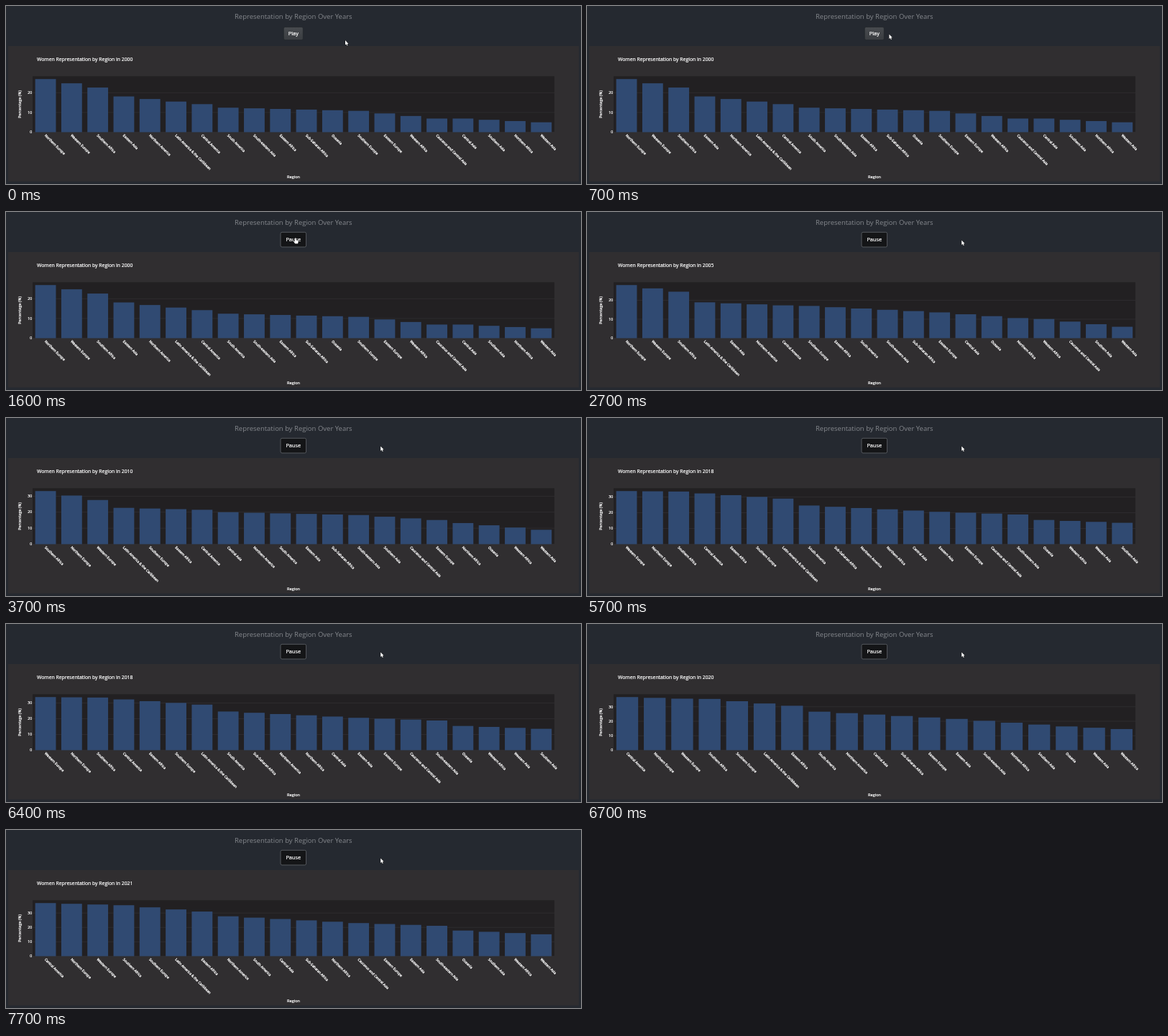
An HTML page with a canvas for the animation above (8 s loop, 800 by 249 pixels).

```html
<!DOCTYPE html>
<html lang="en">
<head>
<meta charset="utf-8">
<title>Representation by Region Over Years</title>
<style>
  html, body { margin: 0; height: 100%; overflow: hidden; background: #252930; }
  canvas { display: block; width: 800px; height: 249px; }
</style>
</head>
<body>
<canvas id="stage"></canvas>
<script>
const LOOP = 8000;
const PLOT = { x: 37, y: 98.3, w: 726, h: 78.2 };
const FONT = '"Open Sans", "Noto Sans", sans-serif';

const NAMES = {
  NEu: 'Northern Europe', WEu: 'Western Europe', SEu: 'Southern Europe', EEu: 'Eastern Europe',
  NAf: 'Northern Africa', WAf: 'Western Africa', SAf: 'Southern Africa', EAf: 'Eastern Africa',
  SSA: 'Sub-Saharan Africa', Oce: 'Oceania',
  EAs: 'Eastern Asia', WAs: 'Western Asia', SAs: 'Southern Asia', CAs: 'Central Asia',
  SEA: 'South-eastern Asia', CCA: 'Caucasus and Central Asia',
  NAm: 'Northern America', CAm: 'Central America', SAm: 'South America',
  LAC: 'Latin America & the Caribbean',
};

// Each year: ranking, and the percentage curve at the ranks in KNOTS
const KNOTS = [0, 2, 3, 6, 7, 12, 15, 16, 19];
const YEARS = [
  { year: 2000, start: 0, curve: [26.9, 22.6, 18.1, 14.2, 12.4, 10.8, 6.9, 6.9, 5],
    order: 'NEu WEu SAf EAs NAm LAC CAm SAm SEA EAf SSA Oce SEu EEu WAf CCA CAs SAs NAf WAs' },
  { year: 2005, start: 2700, curve: [28, 24.5, 18.9, 17.3, 17, 13.6, 10.6, 10.1, 6],
    order: 'NEu WEu SAf LAC EAs NAm CAm SEu EAf SAm SEA SSA EEu CAs Oce NAf WAf CCA SAs WAs' },
  { year: 2010, start: 3700, curve: [33.2, 27.6, 22.7, 21.5, 20, 18.2, 15.1, 13.2, 9],
    order: 'SAf NEu WEu LAC SEu EAf CAm CAs NAm SAm EAs SSA SEA SAs CCA EEu NAf Oce WAf WAs' },
  { year: 2015, start: 4700, curve: [33.3, 30.3, 29.9, 27.1, 24.2, 19.8, 17.5, 16.6, 12.4],
    order: 'SAf WEu NEu CAm SEu LAC EAf NAf SSA SAm NAm CAs EAs CCA SEA SAs EEu WAf Oce WAs' },
  { year: 2018, start: 5700, curve: [33.8, 33.5, 32.3, 29, 24.6, 20.6, 18.9, 15.4, 13.6],
    order: 'WEu NEu SAf CAm EAf SEu LAC SAm SSA NAm NAf CAs EAs EEu CCA SEA Oce WAf WAs SAs' },
  { year: 2020, start: 6700, curve: [36.7, 35.6, 35.4, 30.7, 26.6, 21.6, 17.7, 16.4, 13.7],
    order: 'CAm NEu WEu SAf SEu LAC EAf SAm NAm CAs SSA EEu EAs SEA NAf SAs Oce WAs WAf' },
  { year: 2021, start: 7700, curve: [36.9, 35.9, 35.4, 31, 27.7, 23, 21.1, 17.8, 15.2],
    order: 'CAm NEu WEu SAf SEu LAC EAf NAm SAm CAs SSA NAf CCA EEu EAs SEA Oce SAs WAf WAs' },
];

const canvas = document.getElementById('stage');
const ctx = canvas.getContext('2d');
const ratio = window.devicePixelRatio || 1;
canvas.width = 800 * ratio;
canvas.height = 249 * ratio;

function rect(x, y, w, h, color) {
  ctx.fillStyle = color;
  ctx.fillRect(x, y, w, h);
}

// "weight" thickens the strokes of small text without changing its width
function text(str, x, y, size, { color = '#fff', align = 'center', angle = 0, weight = 0.22 } = {}) {
  ctx.save();
  ctx.translate(x, y);
  ctx.rotate(angle);
  ctx.font = `${size}px ${FONT}`;
  ctx.textAlign = align;
  ctx.fillStyle = ctx.strokeStyle = color;
  ctx.lineWidth = weight;
  ctx.lineJoin = 'round';
  ctx.fillText(str, 0, size * 0.35);
  if (weight) ctx.strokeText(str, 0, size * 0.35);
  ctx.restore();
}

function valueAt(curve, rank) {
  const k = Math.max(1, KNOTS.findIndex(knot => knot >= rank));
  const p = (rank - KNOTS[k - 1]) / (KNOTS[k] - KNOTS[k - 1]);
  return curve[k - 1] + (curve[k] - curve[k - 1]) * p;
}

function drawChart({ year, curve, order }) {
  const codes = order.split(' ');
  const base = PLOT.y + PLOT.h;
  const top = curve[0] / 0.95;
  const scale = PLOT.h / top;
  const slot = PLOT.w / codes.length;

  rect(3, 56, 794, 189.5, '#302e30');
  rect(PLOT.x, PLOT.y, PLOT.w, PLOT.h, '#222022');
  text(`Women Representation by Region in ${year}`, 43, 74.6, 6.85, { align: 'left' });

  for (let tick = 0; tick < top; tick += 10) {
    const y = base - tick * scale;
    rect(PLOT.x, y - 0.4, PLOT.w, 0.8, '#302e31');
    text(tick, 36, y, 5, { align: 'right' });
  }
  codes.forEach((code, i) => {
    const x = PLOT.x + slot * i;
    const height = valueAt(curve, i) * scale;
    rect(x + slot * 0.1, base - height, slot * 0.8 - 0.2, height, '#304a72');
    text(NAMES[code], x + slot / 2 - 0.5, 180.3, 4.8, { align: 'left', angle: Math.PI / 4, weight: 0.3 });
  });
  text('Percentage (%)', 18.7, 137.5, 5.6, { angle: -Math.PI / 2 });
  text('Region', 400, 239.5, 5.6);
}

function roundBox(x, y, w, h, fill, stroke, line) {
  ctx.beginPath();
  ctx.roundRect(x, y, w, h, 2);
  ctx.fillStyle = fill;
  ctx.fill();
  ctx.strokeStyle = stroke;
  ctx.lineWidth = line;
  ctx.stroke();
}

function drawButton(playing, hover) {
  if (playing) {
    roundBox(382, 28.3, 35.6, 20.7, '#141517', '#54585d', 1);
  } else {
    const shade = ctx.createLinearGradient(0, 29, 0, 48);
    shade.addColorStop(0, hover ? '#26292c' : '#484b4f');
    shade.addColorStop(1, hover ? '#1d1f22' : '#3a3d41');
    roundBox(386.3, 29.5, 27, 18, shade, '#1f2227', 0.6);
  }
  text(playing ? 'Pause' : 'Play', 399.8, 38.7, 7.4);
}

const ARROW = new Path2D('M0 0V6.6L1.5 5.3L2.5 7.5L3.5 7L2.6 4.9H4.5Z');
const HAND = new Path2D('M-.8 0Q0 -1 .7 0V2.6L3.3 3.3Q4.1 3.6 3.9 4.8L3.3 7.6H-.6L-2.6 4.7Q-2.6 3.8 -1.7 4L-.8 4.7Z');

function drawCursor(x, y, shape) {
  ctx.save();
  ctx.translate(x, y);
  ctx.lineWidth = 0.7;
  ctx.strokeStyle = '#111';
  ctx.fillStyle = '#fff';
  ctx.stroke(shape);
  ctx.fill(shape);
  ctx.restore();
}

// Progress of a move that advances in visible 100 ms steps
function stepped(t, start, steps) {
  const p = Math.min(1, Math.max(0, (Math.floor((t - start) / 100) + 1) / steps));
  return p * p * (3 - 2 * p);
}

function cursorAt(t) {
  if (t < 100) return [472, 48];
  const approach = stepped(t, 400, 6);
  const leave = stepped(t, 1800, 5);
  return [
    470.7 - 67.9 * approach + 118.4 * leave,
    47.3 - 10.6 * approach + 2.7 * leave,
  ];
}

function draw(t) {
  const [x, y] = cursorAt(t);
  const playing = t >= 1600;
  const hover = x < (playing ? 418 : 413);

  ctx.setTransform(ratio, 0, 0, ratio, 0, 0);
  rect(0, 0, 800, 249, '#252930');
  text('Representation by Region Over Years', 399.8, 14.7, 9.5, { color: '#85888d', weight: 0 });
  drawButton(playing, hover);
  drawChart(YEARS.findLast(({ start }) => t >= start));
  drawCursor(x, y, hover ? HAND : ARROW);
}

function frame() {
  draw(performance.now() % LOOP);
  requestAnimationFrame(frame);
}
frame();
</script>
</body>
</html>
```
